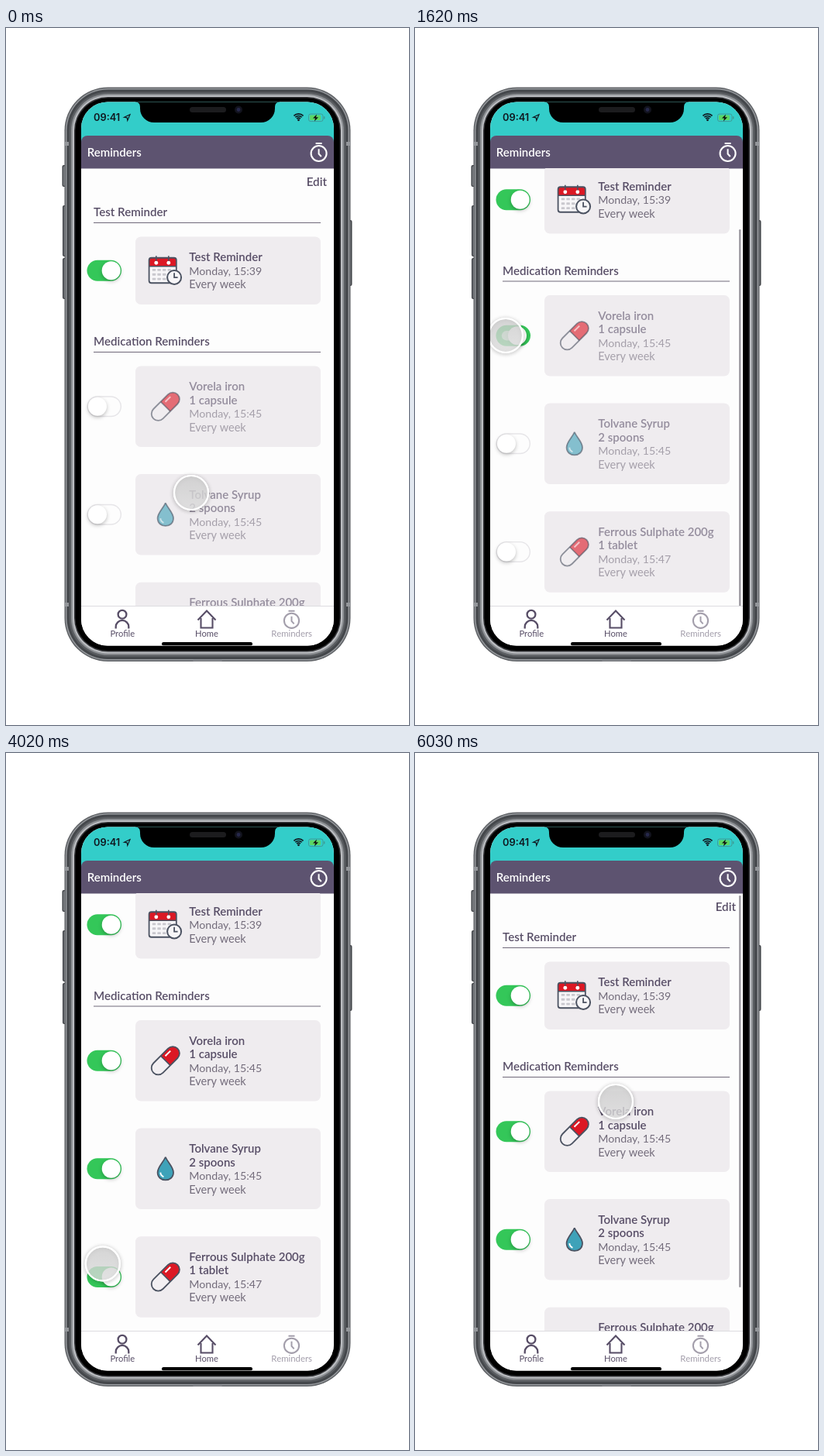
Recreate the animation shown at these times as an HTML page with a canvas. Size 520 px wide and 900 px high, loop 8280 ms.

```html
<!DOCTYPE html>
<html lang="en">
<head>
<meta charset="utf-8">
<title>Reminders</title>
<style>
html, body { margin: 0; width: 100%; height: 100%; overflow: hidden; background: #fff; }
canvas { display: block; width: 520px; height: 900px; }
</style>
</head>
<body>
<canvas id="stage"></canvas>
<script>
const W = 520, H = 900, LOOP = 8280, STEP = 30;
const MAX_SCROLL = 91.5;
const INK = '#574d66', SOFT = '#736c7b', PALE = '#a39eab';
const OUTLINE = '#4b5261', RED = '#dc1824', CARD = '#efecef';
const SCREEN = [97, 95.5, 326, 702, 34];

const canvas = document.getElementById('stage');
const dpr = window.devicePixelRatio || 1;
canvas.width = W * dpr;
canvas.height = H * dpr;
const ctx = canvas.getContext('2d');

// Timing helpers
const clamp = v => Math.max(0, Math.min(1, v));
const lerp = (a, b, p) => a + (b - a) * p;
const ramp = (t, a, b) => clamp((t - a) / (b - a));
const ease = p => p < .5 ? 4 * p ** 3 : 1 - 4 * (1 - p) ** 3;
const easeOut = p => 1 - (1 - p) ** 3;

const moves = [
  { from: 510, to: 1107, x: 239, y: 430 },
  { from: 1110, to: 1380, x: 117, y: 397 },
  { from: 1800, to: 2370, x: 118, y: 540 },
  { from: 2760, to: 3330, x: 118, y: 677 },
  { from: 3895, to: 4440, x: 259, y: 313 },
  { from: 4440, to: 4924, x: 259, y: 450 }
];
const presses = [
  [390, 540, 1110, 1230], [1320, 1410, 1440, 1560], [2370, 2460, 2490, 2640],
  [3330, 3420, 3450, 3600], [4350, 4440, 4920, 5070]
];

function fingerAt(t) {
  let x = 239, y = 600;
  for (const m of moves) {
    const p = ease(ramp(t, m.from, m.to));
    x = lerp(x, m.x, p);
    y = lerp(y, m.y, p);
  }
  let r = 23;
  for (const [a, b, c, d] of presses) r -= 3 * (ramp(t, a, b) - ramp(t, c, d));
  return { x, y, r };
}

function rubber(s) {
  if (s < 0) return s * .5;
  return s > MAX_SCROLL ? MAX_SCROLL + (s - MAX_SCROLL) * .45 : s;
}

function scrollAt(t) {
  if (t < 1110) return rubber((600 - fingerAt(t).y) * .765);
  if (t < 4440) return lerp(rubber(170 * .765), MAX_SCROLL, easeOut(ramp(t, 1110, 1530)));
  if (t < 4950) return rubber(MAX_SCROLL - (fingerAt(t).y - 313));
  return lerp(rubber(MAX_SCROLL - 137), 0, easeOut(ramp(t, 4950, 5790)));
}

// Drawing helpers
function box(x, y, w, h, r, fill) {
  ctx.beginPath();
  ctx.roundRect(x, y, w, h, r);
  if (fill) { ctx.fillStyle = fill; ctx.fill(); }
}

function disc(x, y, r, fill, stroke, width) {
  ctx.beginPath();
  ctx.arc(x, y, r, 0, Math.PI * 2);
  if (fill) { ctx.fillStyle = fill; ctx.fill(); }
  if (stroke) { ctx.strokeStyle = stroke; ctx.lineWidth = width; ctx.stroke(); }
}

function line(points, color, width) {
  ctx.beginPath();
  points.forEach(([x, y]) => ctx.lineTo(x, y));
  ctx.strokeStyle = color;
  ctx.lineWidth = width;
  ctx.stroke();
}

function text(str, x, y, size, color, weight = 600, align = 'left', family = 'Lato') {
  ctx.font = `${weight} ${size}px ${family}, sans-serif`;
  ctx.textAlign = align;
  ctx.fillStyle = color;
  ctx.fillText(str, x, y);
}

function group(x, y, draw) {
  ctx.save();
  ctx.translate(x, y);
  draw();
  ctx.restore();
}

// Icons
function stopwatch(x, y, r, color) {
  disc(x, y, r, null, color, 2.1);
  line([[x - 4, y - r - 3], [x + 4, y - r - 3]], color, 2.1);
  line([[x, y - r * .58], [x, y + .5], [x + 3.2, y + 4]], color, 2);
}

function calendar() {
  box(-21.2, -16.5, 35.2, 32.5, 3, '#f7f6f8');
  box(-21.2, -16.5, 35.2, 11, [3, 3, 0, 0], RED);
  line([[-21.2, -5.5], [14, -5.5]], OUTLINE, 1.5);
  box(-21.2, -16.5, 35.2, 32.5, 3);
  ctx.strokeStyle = OUTLINE;
  ctx.lineWidth = 1.8;
  ctx.stroke();
  for (const x of [-12, 4]) {
    disc(x, -10, 2.4, '#fff');
    line([[x, -19], [x, -12.5]], OUTLINE, 1.6);
  }
  for (let i = 0; i < 12; i++)
    box(-17 + i % 4 * 6.6, -2.2 + Math.floor(i / 4) * 5.8, 4.4, 2.8, .5, '#c9c8ce');
  disc(11.3, 8.7, 9, '#f7f6f8', OUTLINE, 2);
  line([[11.3, 3], [11.3, 8.8], [15.8, 8.8]], OUTLINE, 1.8);
}

function pill() {
  ctx.rotate(-Math.PI / 4);
  box(-22, -8.7, 44, 17.4, 8.7, '#f2eff2');
  box(0, -8.7, 22, 17.4, [0, 8.7, 8.7, 0], RED);
  line([[4, -4.4], [13.5, -4.4]], '#fff', 2);
  line([[0, -8.7], [0, 8.7]], OUTLINE, 1.6);
  box(-22, -8.7, 44, 17.4, 8.7);
  ctx.strokeStyle = OUTLINE;
  ctx.lineWidth = 1.8;
  ctx.stroke();
}

function drop() {
  ctx.beginPath();
  ctx.moveTo(0, -15);
  ctx.bezierCurveTo(3, -8, 10.2, -2, 10.2, 4.8);
  ctx.bezierCurveTo(10.2, 18, -10.2, 18, -10.2, 4.8);
  ctx.bezierCurveTo(-10.2, -2, -3, -8, 0, -15);
  ctx.fillStyle = '#3ea2b9';
  ctx.fill();
  ctx.strokeStyle = OUTLINE;
  ctx.lineWidth = 1.8;
  ctx.stroke();
  ctx.beginPath();
  ctx.arc(0, 4.5, 6.5, Math.PI * .62, Math.PI * .98);
  ctx.strokeStyle = '#fff';
  ctx.lineWidth = 1.8;
  ctx.stroke();
}

const rows = [
  { top: 269.5, h: 87.5, icon: calendar, title: ['Test Reminder'], when: 'Monday, 15:39' },
  { top: 436.5, h: 104.5, icon: pill, title: ['Vorela iron', '1 capsule'], when: 'Monday, 15:45', at: 1470 },
  { top: 576, h: 104.5, icon: drop, title: ['Tolvane Syrup', '2 spoons'], when: 'Monday, 15:45', at: 2475 },
  { top: 715.7, h: 104.5, icon: pill, title: ['Ferrous Sulphate 200g', '1 tablet'], when: 'Monday, 15:47', at: 3450 }
];

function toggle(y, k) {
  const x = 104.5, w = 44.5, h = 27, top = y - h / 2;
  box(x, top, w, h, h / 2, k > 0 ? `rgba(52,199,89,${clamp(k * 1.6)})` : '#e6e5e8');
  if (k < 1) {
    const inset = lerp(1.4, h / 2, k ** 3);
    if (k > 0) ctx.globalAlpha = 1 - k * .4;
    box(x + inset, top + inset, w - inset * 2, h - inset * 2, h / 2 - inset, '#fdfdfd');
    ctx.globalAlpha = 1;
  }
  ctx.save();
  ctx.shadowColor = 'rgba(0,0,0,.25)';
  ctx.shadowBlur = 5 * dpr;
  ctx.shadowOffsetY = 2 * dpr;
  disc(lerp(118, 135.7, k), y, 12, '#fff');
  ctx.restore();
}

function row(r, t) {
  const on = r.at ? ramp(t, r.at + 240, r.at + 330) : 1;
  const mid = r.top + r.h / 2;
  box(167, r.top, 239, r.h, 7, CARD);
  toggle(mid, r.at ? ease(ramp(t, r.at, r.at + 240)) : 1);
  ctx.globalAlpha = lerp(.6, 1, on);
  group(205.8, mid, r.icon);
  let y = r.top + 31.5;
  for (const s of r.title) {
    text(s, 236.3, y, 15, INK);
    y += 17.6;
  }
  text(r.when, 236.3, y, 14.2, SOFT, 400);
  text('Every week', 236.3, y + 17.5, 14.5, SOFT, 400);
  ctx.globalAlpha = 1;
}

function heading(s, y) {
  text(s, 113, y, 15.1, INK);
  line([[113, y + 8.5], [406, y + 8.5]], '#6f6879', 1);
}

function list(t) {
  const s = scrollAt(t);
  ctx.save();
  ctx.beginPath();
  ctx.rect(97, 181, 326, 565);
  ctx.clip();
  group(0, -s, () => {
    text('Edit', 414, 204, 15.2, INK, 600, 'right');
    heading('Test Reminder', 243);
    heading('Medication Reminders', 410);
    rows.forEach(r => row(r, t));
  });
  const show = ramp(t, 510, 600) - ramp(t, 1700, 1950) + ramp(t, 4440, 4530);
  if (show > 0) {
    ctx.globalAlpha = show;
    box(418, 184 + Math.max(0, s) * .83, 2.6, 506 + Math.min(0, s), 1.3, '#a19ea5');
  }
  ctx.restore();
}

function statusBar() {
  box(97, 95, 326, 60, 0, '#33cdc9');
  text('09:41', 113, 120, 12.8, '#101820', 600, 'left', 'Inter');
  ctx.beginPath();
  [[152.5, 115.3], [160, 111.8], [156.8, 119.4], [156.2, 115.8]].forEach(([x, y]) => ctx.lineTo(x, y));
  ctx.closePath();
  ctx.strokeStyle = '#101820';
  ctx.lineWidth = 1.2;
  ctx.stroke();

  for (const r of [3.4, 6, 8.6]) {
    ctx.beginPath();
    ctx.arc(377.5, 119.5, r, -Math.PI * .75, -Math.PI * .25);
    ctx.strokeStyle = '#101820';
    ctx.lineWidth = 1.7;
    ctx.stroke();
  }
  disc(377.5, 118.8, 1.4, '#101820');

  box(390.5, 111, 18.5, 9.6, 2.6);
  ctx.strokeStyle = '#3f9c97';
  ctx.lineWidth = 1;
  ctx.stroke();
  box(392, 112.5, 14, 6.6, 1.4, '#5bd764');
  box(410, 114, 1.4, 3.6, .7, '#3f9c97');
  ctx.beginPath();
  [[401, 111.5], [396, 116.5], [399, 116.5], [398, 120.5], [403, 115.3], [400, 115.3]]
    .forEach(([x, y]) => ctx.lineTo(x, y));
  ctx.fillStyle = '#111';
  ctx.fill();

  ctx.beginPath();
  ctx.moveTo(167, 94);
  ctx.lineTo(167, 95.5);
  ctx.quadraticCurveTo(173, 95.5, 173, 102);
  ctx.arcTo(173, 122, 191, 122, 18);
  ctx.arcTo(347, 122, 347, 104, 18);
  ctx.lineTo(347, 102);
  ctx.quadraticCurveTo(347, 95.5, 353, 95.5);
  ctx.lineTo(353, 94);
  ctx.fillStyle = '#000';
  ctx.fill();
  box(237, 102, 47, 7, 3.5, '#1c1c1e');
  disc(300, 105.5, 5, '#12131d');
  disc(300, 105.5, 2.4, '#26284a');
}

function navBar() {
  box(97, 746, 326, 52, 0, '#fff');
  line([[97, 746.5], [423, 746.5]], '#dddce0', 1);
  disc(150, 757.2, 5.4, null, INK, 2.3);
  ctx.beginPath();
  ctx.moveTo(141.7, 775.5);
  ctx.lineTo(141.7, 773.5);
  ctx.arc(150, 773.2, 8.3, Math.PI, 0);
  ctx.lineTo(158.3, 775.5);
  ctx.strokeStyle = INK;
  ctx.lineWidth = 2.3;
  ctx.stroke();
  line([[247.5, 764.5], [259, 752.5], [270.5, 764.5]], INK, 2.1);
  line([[251.5, 762], [251.5, 774.5], [266.5, 774.5], [266.5, 762]], INK, 2.1);
  stopwatch(368.5, 765.3, 9.6, PALE);
  text('Profile', 150.3, 786, 11.2, INK, 400, 'center');
  text('Home', 259, 786, 11.2, INK, 400, 'center');
  text('Reminders', 368.7, 786, 11.4, PALE, 400, 'center');
  box(201, 793, 117, 4.5, 2.2, '#000');
}

function phone() {
  const buttons = [[72.5, 177, 28], [73, 229, 66], [73, 297, 53], [440.5, 248, 85]];
  for (const [x, y, h] of buttons) {
    box(x, y, 6, h, 2, '#3f4246');
    box(x + 1.5, y + 1, 3, h - 2, 1.5, '#85888d');
  }
  const rings = [
    [0, '#606367'], [1.5, '#96999d'], [3, '#44474b'], [6, '#5a5d61'],
    [8.5, '#8d9094'], [10.5, '#bcbec2'], [12.5, '#303134'], [14, '#000']
  ];
  for (const [d, color] of rings)
    box(75.5 + d, 76.5 + d, 369 - d * 2, 741.5 - d * 2, 56 - d, color);
  for (const y of [147, 742])
    for (const x of [75.5, 439]) box(x, y, 5.5, 5, 0, '#94979b');
  box(241, 815.5, 38, 2, 1, '#85888d');
}

function finger({ x, y, r }) {
  ctx.save();
  ctx.shadowColor = 'rgba(0,0,0,.4)';
  ctx.shadowBlur = 5 * dpr;
  ctx.shadowOffsetY = 1 * dpr;
  disc(x, y, r - 1, null, '#fff', 2.2);
  ctx.restore();
  const shade = ctx.createLinearGradient(x, y - r, x, y + r);
  shade.addColorStop(0, 'rgba(202,202,202,.8)');
  shade.addColorStop(1, 'rgba(220,220,220,.8)');
  disc(x, y, r - 2, shade);
  disc(x, y, r - 1, null, '#fff', 2.2);
}

function draw(t) {
  ctx.setTransform(dpr, 0, 0, dpr, 0, 0);
  ctx.fillStyle = '#fff';
  ctx.fillRect(0, 0, W, H);
  phone();
  ctx.save();
  box(...SCREEN);
  ctx.clip();
  box(97, 95, 326, 703, 0, '#fdfdfd');
  statusBar();
  box(97, 139, 326, 42.5, [8, 8, 0, 0], '#5d5370');
  text('Reminders', 104.7, 165.5, 15, '#fff');
  stopwatch(403.6, 162, 10, '#fff');
  list(t);
  navBar();
  finger(fingerAt(t));
  ctx.restore();
}

const start = performance.now();
function tick() {
  const t = (performance.now() - start) % LOOP;
  draw(Math.floor(t / STEP) * STEP);
  requestAnimationFrame(tick);
}
tick();
</script>
</body>
</html>
```
